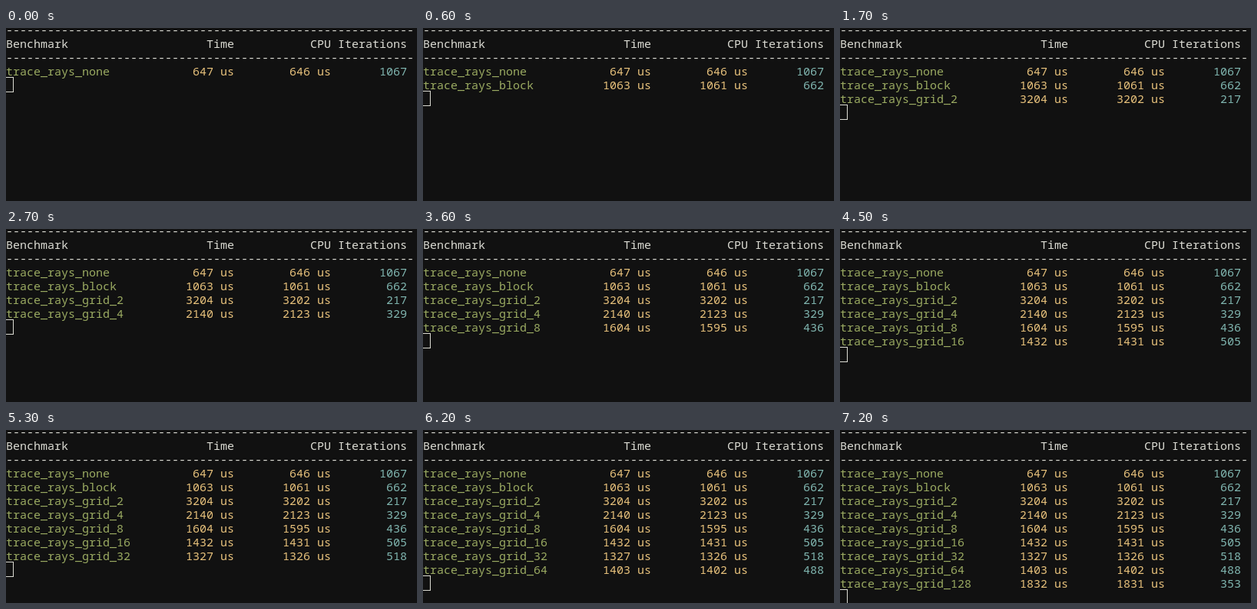
An HTML page that plays this animation: 535x226 px, repeating every 8000 ms.

```html
<!DOCTYPE html>
<html lang="en">
<head>
<meta charset="utf-8">
<title>Ray tracing benchmark</title>
<style>
  html, body, main {
    margin: 0;
    width: 100%;
    height: 100%;
    overflow: hidden;
    background: #111;
  }
  main { position: relative; }
  pre {
    position: absolute;
    left: 0;
    top: -7px;
    margin: 0;
    font: 15px/18px "Noto Sans Mono", monospace;
    color: #dcdcd4;
  }
  .name { color: #9bab62; }
  .time { color: #e8c27c; }
  .runs { color: #80b6b0; }

  /* Hides the rows not yet printed and carries the cursor. */
  .pending {
    position: absolute;
    left: 0;
    top: 66px;
    width: 100%;
    height: 160px;
    background: #111;
    animation: print 8s step-end infinite;
  }
  /* The outline lies one pixel outside its 9 by 18 cell. */
  .pending::before {
    content: "";
    position: absolute;
    left: -1px;
    top: -2px;
    box-sizing: border-box;
    width: 11px;
    height: 20px;
    border: 1px solid #dcdcd4;
  }
  @keyframes print {
    0%     { transform: translateY(0); }
    7.5%   { transform: translateY(18px); }
    21.25% { transform: translateY(36px); }
    33.75% { transform: translateY(54px); }
    45%    { transform: translateY(72px); }
    56.25% { transform: translateY(90px); }
    66.25% { transform: translateY(108px); }
    77.5%  { transform: translateY(126px); }
    90%, 100% { transform: translateY(144px); }
  }
</style>
</head>
<body>
<main>
  <pre id="log"></pre>
  <div class="pending"></div>
</main>
<script>
  const results = [
    ["none", 647, 646, 1067],
    ["block", 1063, 1061, 662],
    ["grid_2", 3204, 3202, 217],
    ["grid_4", 2140, 2123, 329],
    ["grid_8", 1604, 1595, 436],
    ["grid_16", 1432, 1431, 505],
    ["grid_32", 1327, 1326, 518],
    ["grid_64", 1403, 1402, 488],
    ["grid_128", 1832, 1831, 353]
  ];

  const rule = "-".repeat(59);
  const span = (kind, text) => `<span class="${kind}">${text}</span>`;
  const columns = (name, time, cpu, runs) =>
    [name.padEnd(20), time.padStart(13), cpu.padStart(14), runs.padStart(11)];

  const rows = results.map(([scene, time, cpu, runs]) => {
    const [a, b, c, d] = columns("trace_rays_" + scene, time + " us", cpu + " us", String(runs));
    return span("name", a) + span("time", b + c) + span("runs", d);
  });

  const header = columns("Benchmark", "Time", "CPU", "Iterations").join("");
  document.getElementById("log").innerHTML = [rule, header, rule, ...rows].join("\n");
</script>
</body>
</html>
```
